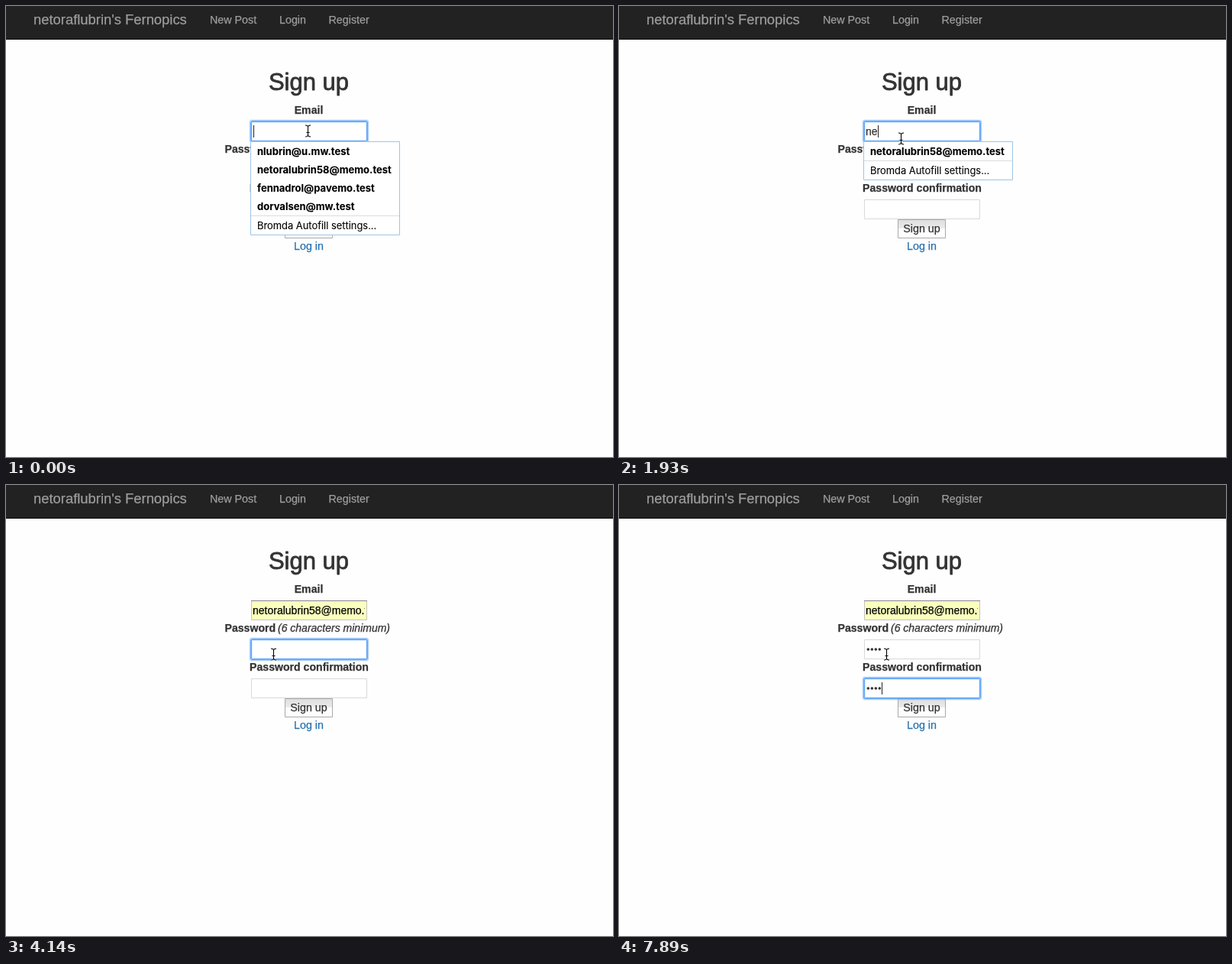
These frames come from a looping animation (795x590 px, 8000 ms). An HTML page with a canvas:

```html
<!DOCTYPE html>
<html lang="en">
<head>
<meta charset="utf-8">
<title>Sign up</title>
<style>
  html, body { margin: 0; width: 100%; height: 100%; overflow: hidden; background: #fefefe; }
  canvas { display: block; }
</style>
</head>
<body>
<canvas id="stage" width="795" height="590"></canvas>
<script>
const ctx = document.getElementById('stage').getContext('2d');
const LOOP = 8000;
const PAGE = '"Liberation Sans", Arial, sans-serif';
const MENU = 'Inter, "Open Sans", sans-serif';
const BODY = `14.3px ${PAGE}`;
const BOLD = `bold 14.1px ${PAGE}`;
const INPUT = `14px ${PAGE}`;

const EMAIL = 'netoralubrin58@memo.test';
const EMAIL_ALT = 'nlubrin@u.mw.test';
const ALL = [EMAIL_ALT, EMAIL, 'fennadrol@pavemo.test', 'dorvalsen@mw.test'];

// Fields share one box; each has its own top edge.
const BOX = { x: 321, w: 152, h: 26 };
const TOPS = { email: 151, password: 202, confirm: 253 };

// Each step changes part of the state from its time on.
const STEPS = [
  [0, { email: '', password: 0, confirm: 0, focus: 'email', caret: true,
        filled: false, hover: false, options: ALL, mouse: [395, 163] }],
  [150, { email: 'n', options: ALL.slice(0, 2) }],
  [300, { email: 'nl' }],
  [450, { options: [EMAIL_ALT] }],
  [890, { caret: false, mouse: [391, 165] }],
  [1040, { mouse: [380, 169] }],
  [1190, { mouse: [371, 172] }],
  [1340, { caret: true, mouse: [369, 173] }],
  [1630, { email: 'n', options: ALL.slice(0, 2) }],
  [1930, { email: 'ne', options: [EMAIL] }],
  [2230, { email: 'net' }],
  [2670, { caret: false, mouse: [368, 176] }],
  [2810, { mouse: [366, 185], hover: true, filled: true, email: EMAIL }],
  [2960, { mouse: [365, 189] }],
  [3110, { options: [], hover: false }],
  [3250, { mouse: [362, 196] }],
  [3400, { mouse: [356, 208] }],
  [3540, { mouse: [351, 219] }],
  [3690, { mouse: [350, 221], focus: 'password', caret: true }],
  [4140, { caret: false }],
  [4740, { caret: true }],
  [5190, { caret: false }],
  [5640, { caret: true }],
  [5790, { password: 1 }],
  [5940, { password: 2 }],
  [6390, { password: 3 }],
  [6540, { password: 4 }],
  [6840, { focus: 'confirm' }],
  [7290, { caret: false }],
  [7440, { caret: true, confirm: 1 }],
  [7590, { confirm: 2 }],
  [7740, { confirm: 3 }],
  [7890, { confirm: 4 }]
];

function stateAt(time) {
  return Object.assign({}, ...STEPS.filter(([start]) => start <= time).map(([, patch]) => patch));
}

function rect(x, y, w, h, color) {
  ctx.fillStyle = color;
  ctx.fillRect(x, y, w, h);
}

function frame(x, y, w, h, color) {
  ctx.strokeStyle = color;
  ctx.lineWidth = 1;
  ctx.strokeRect(x + 0.5, y + 0.5, w - 1, h - 1);
}

// A faint outline gives the text its slightly heavier weight.
function text(str, x, y, font, color = '#333', align = 'left', weight = 0.25) {
  ctx.font = font;
  ctx.fillStyle = ctx.strokeStyle = color;
  ctx.textAlign = align;
  ctx.lineWidth = weight;
  ctx.lineJoin = 'round';
  ctx.fillText(str, x, y);
  ctx.strokeText(str, x, y);
}

function drawNavbar() {
  rect(0, 0, 795, 43, '#222');
  rect(0, 43, 795, 1, '#080808');
  const grey = '#9d9d9d';
  text("netoraflubrin's Fernopics", 36, 24, `18.4px ${PAGE}`, grey);
  text('New Post', 267, 23, BODY, grey);
  text('Login', 358, 23, BODY, grey);
  text('Register', 422.5, 23, BODY, grey);
}

function drawPage() {
  text('Sign up', 396.5, 110, `31px ${PAGE}`, '#333', 'center', 0.8);
  text('Email', 396.5, 141, BOLD, '#333', 'center');
  text('Password', 286.5, 192, BOLD);
  text('(6 characters minimum)', 356, 192, `italic 14px ${PAGE}`);
  text('Password confirmation', 397, 243, BOLD, '#333', 'center');
  rect(365, 279, 63, 25, '#fefefe');
  const shade = ctx.createLinearGradient(0, 280, 0, 291);
  shade.addColorStop(0, '#dedede');
  shade.addColorStop(1, '#ebebeb');
  rect(366, 280, 61, 11, shade);
  frame(365, 279, 63, 25, '#a9a9a9');
  text('Sign up', 396.5, 296, BODY, '#333', 'center');
  text('Log in', 396.5, 319, BODY, '#2a73b0', 'center');
}

// Translucent outlines, strongest on the field's edge, fading outwards.
function drawFocusRing(y) {
  const ring = [[3, 0.12], [2, 0.5], [1, 0.9], [0, 0.9], [-1, 0.2]];
  for (const [grow, alpha] of ring) {
    ctx.strokeStyle = `rgba(95, 165, 250, ${alpha})`;
    ctx.lineWidth = 1;
    ctx.beginPath();
    ctx.roundRect(BOX.x - grow + 0.5, y - grow + 0.5,
      BOX.w + 2 * grow - 1, BOX.h + 2 * grow - 1, Math.max(grow, 0));
    ctx.stroke();
  }
}

function drawField(name, state) {
  const y = TOPS[name];
  const value = state[name];
  const filled = name === 'email' && state.filled;
  rect(BOX.x, y, BOX.w, BOX.h, filled ? '#faffbd' : '#fff');
  frame(BOX.x, y, BOX.w, BOX.h, filled ? '#c3c3c3' : '#d9d9d9');
  if (filled) rect(BOX.x, y, BOX.w, 1, '#85858f');
  if (state.focus === name) drawFocusRing(y);

  let caretX = 324;
  if (name === 'email') {
    ctx.save();
    ctx.beginPath();
    ctx.rect(322, y, 148, BOX.h);
    ctx.clip();
    text(value, 323, y + 18, INPUT, filled ? '#000' : '#333');
    ctx.restore();
    ctx.font = INPUT;
    caretX = Math.floor(324.2 + ctx.measureText(value).width);
  } else {
    ctx.fillStyle = '#333';
    for (let i = 0; i < value; i++) {
      ctx.beginPath();
      ctx.arc(326.3 + 5 * i, y + 13, 1.8, 0, 2 * Math.PI);
      ctx.fill();
    }
    caretX += 5 * value;
  }
  if (state.focus === name && state.caret) rect(caretX, y + 5, 1, 16, '#222');
}

function drawMenu({ options, hover }) {
  if (!options.length) return;
  const width = options.includes(EMAIL) ? 196 : 175;
  const rowsEnd = 178 + 24 * options.length;
  const height = rowsEnd - 177 + 26;
  rect(320, 177, width, height, '#fff');
  if (hover) rect(321, 178, width - 2, 24, '#cdcdcd');
  options.forEach((option, i) => text(option, 329, 195 + 24 * i, `bold 13px ${MENU}`, '#000', 'left', 0.1));
  rect(321, rowsEnd, width - 2, 1, '#dcdcdc');
  text('Bromda Autofill settings...', 329, rowsEnd + 18, `12.9px ${MENU}`, '#000', 'left', 0.1);
  frame(320, 177, width, height, '#9fc5e4');
}

function drawMouse([x, y]) {
  const beam = new Path2D();
  beam.moveTo(-3.5, -7);
  beam.quadraticCurveTo(0, -7, 0, -4.5);
  beam.quadraticCurveTo(0, -7, 3.5, -7);
  beam.moveTo(0, -5);
  beam.lineTo(0, 6);
  beam.moveTo(-3.5, 8);
  beam.quadraticCurveTo(0, 8, 0, 5.5);
  beam.quadraticCurveTo(0, 8, 3.5, 8);
  beam.moveTo(-2, 2.5);
  beam.lineTo(2, 2.5);
  ctx.save();
  ctx.translate(x + 0.5, y);
  ctx.lineWidth = 2.6;
  ctx.strokeStyle = 'rgba(255, 255, 255, 0.85)';
  ctx.stroke(beam);
  ctx.lineWidth = 1.1;
  ctx.strokeStyle = '#000';
  ctx.stroke(beam);
  ctx.restore();
}

function draw(time) {
  const state = stateAt(time);
  rect(0, 0, 795, 590, '#fefefe');
  drawNavbar();
  drawPage();
  Object.keys(TOPS).forEach(name => drawField(name, state));
  drawMenu(state);
  drawMouse(state.mouse);
}

const started = performance.now();
function tick() {
  draw((performance.now() - started) % LOOP);
  requestAnimationFrame(tick);
}
tick();
</script>
</body>
</html>
```
